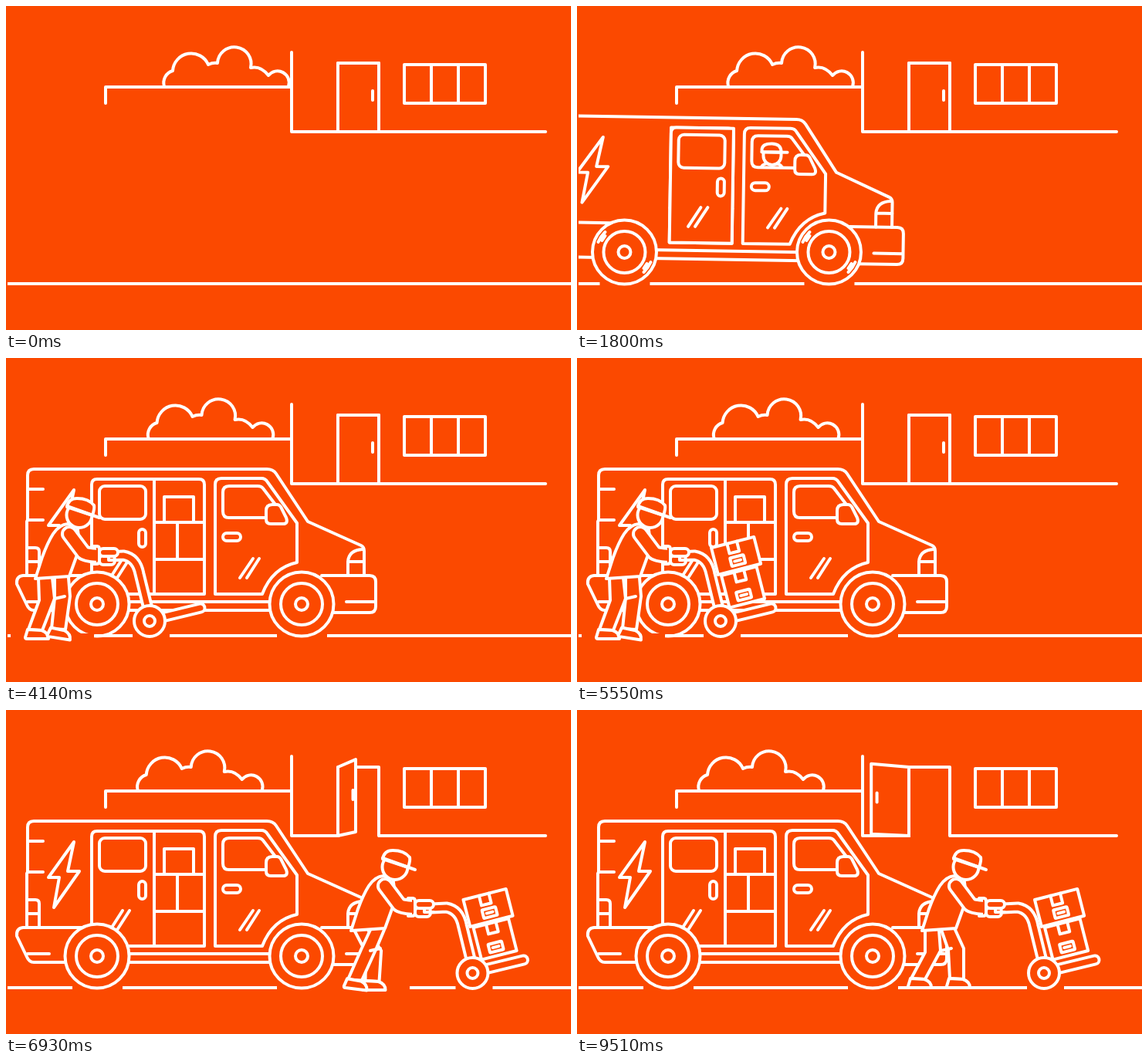
These frames come from a looping animation (732 px wide and 420 px high, 9.54 s). An HTML page with a canvas:

```html
<!DOCTYPE html>
<html lang="en">
<head>
<meta charset="utf-8">
<title>Delivery van</title>
<style>
html, body { margin: 0; width: 732px; height: 420px; overflow: hidden; background: #fb4900; }
canvas { display: block; }
</style>
</head>
<body>
<canvas width="732" height="420"></canvas>
<script>
const c = document.querySelector('canvas').getContext('2d');
const BG = '#fb4900', INK = '#fff', LOOP = 9540;

const clamp = (v, a, b) => Math.min(b, Math.max(a, v));
const mix = (a, b, k) => a + (b - a) * k;
const ease = (t, a, b) => { const k = clamp((t - a) / (b - a), 0, 1); return k * k * (3 - 2 * k); };

function line(d) { c.stroke(new Path2D(d)); }
function shape(d) { const p = new Path2D(d); c.fill(p); c.stroke(p); }
function box(x, y, w, h, r = 0) {
  c.beginPath();
  c.roundRect(x, y, w, h, r);
  c.fill();
  c.stroke();
}
function disc(x, y, r) {
  c.beginPath();
  c.arc(x, y, r, 0, 7);
  c.fill();
  c.stroke();
}
// Outlined pipe whose two edges lie w apart.
function tube(d, w) {
  const p = new Path2D(d);
  c.lineWidth = w + 4;
  c.stroke(p);
  c.strokeStyle = BG;
  c.lineWidth = w - 4;
  c.stroke(p);
  c.strokeStyle = INK;
  c.lineWidth = 4;
}
function at(x, y, turn, draw) {
  c.save();
  c.translate(x, y);
  c.rotate(turn * Math.PI / 180);
  draw();
  c.restore();
}

function house(t) {
  line('M129 126V105H370M370 60V163H699');
  box(516, 76, 105, 50);
  line('M551 76V126M586 76V126');

  const a = ease(t, 6250, 7800) * 157 * Math.PI / 180;
  const cos = Math.cos(a), lift = 11 * Math.sin(a);
  if (a > 0) c.fillRect(432, 160, 50, 6);
  line('M430 163V74H483V163');
  const x = 430 + 53 * cos, k = 430 + 45 * cos, up = lift * .6;
  shape(`M430 74L${x} ${74 - lift}V${163 - lift / 2}L430 163Z`);
  line(`M${k} ${110 - up}V${122 - up}`);
}

function cloud(t) {
  at(-.00494 * t, 0, 0, () => line('M205 104A16 16 0 0 1 216 84A24 24 0 0 1 262 76Q268 73 274 74' +
    'A21.8 21.8 0 1 1 317 80Q330 77 340 90A15 15 0 0 1 366 104'));
}

function driver(t) {
  const k = ease(t, 2200, 2600);
  if (k === 1) return;
  c.save();
  c.clip(new Path2D('M283 168H328L360 207H283Z'));
  c.translate(0, 45 * k);
  line('M292 212Q293 203 300 202M314 202Q321 203 322 212');
  shape('M296 187V192A11 11 0 0 0 319 192V187');
  shape('M294 187V183Q295 176 307 176Q319 176 319 187Z');
  line('M294 187H327');
  c.restore();
}

function vanBody(t) {
  line('M27 282V212L28 210V152Q28 144 36 144H338Q346 144 350 150L391 212L460 243Q464 245 464 250V282');
  line('M28 170H48M28 210H48M27 246H38Q43 246 43 251V281M27 264H43');
  shape('M88 171L55 217H69L62 256L95 209H80Z');
  line('M98 282H22Q13 283 14 293L27 320Q30 327 36 327H84M28 316H56');
  line('M150 316H350M150 327H350');
  line('M409 282H471Q479 282 479 290V322Q479 330 471 330H420M441 316H479');
  line('M443 282V264Q444 249 462 248M443 264H464');

  // Load space behind the sliding door
  line('M176 306V157H250Q257 157 257 164V306Z');
  line('M176 213H257M222 213V261M176 261H257');
  box(205, 180, 38, 33);
  at(65 * (1 - ease(t, 2250, 2800)), 0, 0, () => {
    shape('M111 306V164Q111 157 118 157H192V306Z');
    box(121, 166, 60, 43, 7);
    box(172, 222, 9, 23, 4.5);
    line('M135 285L151 260M144 285L160 260');
  });

  shape('M271 306V164Q271 156 279 156H331Q336 156 339 161L377 214V265Q345 272 332 306Z');
  line('M289 166H326Q331 166 333 169L362 207H289Q281 207 281 199V174Q281 166 289 166Z');
  driver(t);
  shape('M345 190H351Q354 190 356 193L363 207Q366 215 359 215H343Q337 215 337 209V198Q337 190 345 190Z');
  box(281, 227, 23, 10, 5);
  line('M303 285L320 260M312 285L328 260');
}

function wheel(x, t) {
  c.fillRect(x - 32, 356, 65, 8);
  disc(x, 319, 41.5);
  disc(x, 319, 27);
  disc(x, 319, 8);
  if (t < 2050) at(x, 319, 0, () => line('M-34 -13Q-31 -20 -25 -26M-29 -15L-25 -21M34 13Q31 20 25 26M29 15L25 21'));
}

function van(t) {
  const x = Math.min(0, .475 * (t - 1920));
  if (x < -490) return;
  const s = Math.max(0, t - 1920);
  const dive = .9 * ease(t, 1600, 1800) * Math.exp(-s / 150) * Math.cos(s / 90);
  at(x, 0, 0, () => {
    at(150, 319, dive, () => {
      c.translate(-150, -319);
      vanBody(t);
    });
    wheel(118, t);
    wheel(383, t);
  });
}

function parcel(x, y, w, h, tape, labelX, labelY, k) {
  if (k === 0) return;
  at(x, y, -14.3, () => {
    c.globalAlpha = Math.min(1, k * 2);
    c.translate(0, -30 * (1 - k));
    box(0, 0, w, h);
    line(`M${tape} 0v13h13v-13`);
    box(labelX, labelY, 18, 11, 1);
    line(`M${labelX + 5} ${labelY + 5.5}h8`);
  });
}

function truck(t) {
  tube('M133 257L152 256Q169 259 173 280L183 321', 11);
  tube('M186 340L252 324', 11);
  parcel(187, 282, 47, 43, 17, 13, 26, ease(t, 4200, 4750));
  parcel(174, 246, 57, 36, 21, 20, 19, ease(t, 4840, 5350));
  disc(186, 341, 20);
  disc(186, 341, 7);
}

function leg(hip, kx, ky, ax, ay, tilt) {
  shape(`M${hip - 9} 285L${kx - 10} ${ky}L${ax - 9} ${ay}L${ax + 9} ${ay + 1}L${kx + 10} ${ky - 2}L${hip + 9} 285`);
  at(ax, ay, tilt, () => shape('M-10 0L-13 10Q-13 12 -11 12H17Q17 4 8 1Z'));
}

function legs(t) {
  const phase = clamp((t - 5800) / 680, 0, 1.7) * 2 * Math.PI;
  const stop = ease(t, 6850, 7100);
  const swing = 15 * Math.cos(phase) + 18 * Math.sin(phase);
  const speed = t > 5800 ? (18 * Math.cos(phase) - 15 * Math.sin(phase)) / 23.4 : 0;
  const lift = v => 7 * Math.max(0, v) * ease(t, 5780, 5900);
  const backX = mix(53 - swing, 33, stop), frontX = mix(53 + swing, 83, stop);
  leg(51, mix(53 - (swing - 15) * .5, 52, stop), 314, backX, mix(352 - lift(-speed), 348, stop), 0);
  leg(72, mix(73 + (swing - 15) * .5, 82, stop), 311, frontX, mix(351 - lift(speed), 348, stop), 9 * (1 - stop));
  line('M63 312L76 309');
}

function man(t) {
  legs(t);
  shape('M38 286L47 258Q54 239 61 228Q69 216 80 215H92L96 248L91 258L82 283Z');
  disc(95, 203.5, 16.5);
  shape('M79 193Q81 182 92 182Q107 182 114 191Q115 195 112 204Z');
  line('M79 192L121 207');
  tube('M82 228L100 252Q103 255 119 256', 18);
  c.fillRect(117, 243, 12, 26);
  line('M112 244H118Q121 244 121 248V263Q121 267 117 267H112');
  box(121, 256, 20, 12, 5);
  box(121, 247, 24, 10, 5);
  line('M133 257V262H145');
}

function courier(t) {
  const seen = ease(t, 2950, 3200);
  if (!seen) return;
  const go = Math.max(0, .37 * (t - 5800));
  const manX = Math.min(409, go), truckX = Math.min(419, go);
  c.save();
  c.globalAlpha = seen;
  if (t < 6950) {
    c.fillRect(manX + 6, 357, 108, 6);
    line(`M${manX + 116} 360H${manX + 265}`);
  }
  c.fillRect(truckX + 164, 356, 48, 8);
  at(truckX, 0, 0, () => truck(t));
  at(manX, 0, 0, () => man(t));
  c.restore();
}

function frame(now) {
  const t = now % LOOP;
  c.globalAlpha = 1;
  c.fillStyle = BG;
  c.strokeStyle = INK;
  c.lineWidth = 4;
  c.lineCap = c.lineJoin = 'round';
  c.fillRect(0, 0, 732, 420);
  c.save();
  c.beginPath();
  c.rect(2, 0, 730, 420);
  c.clip();
  cloud(t);
  house(t);
  line('M0 360H740');
  van(t);
  courier(t);
  c.restore();
  requestAnimationFrame(frame);
}
requestAnimationFrame(frame);
</script>
</body>
</html>
```
